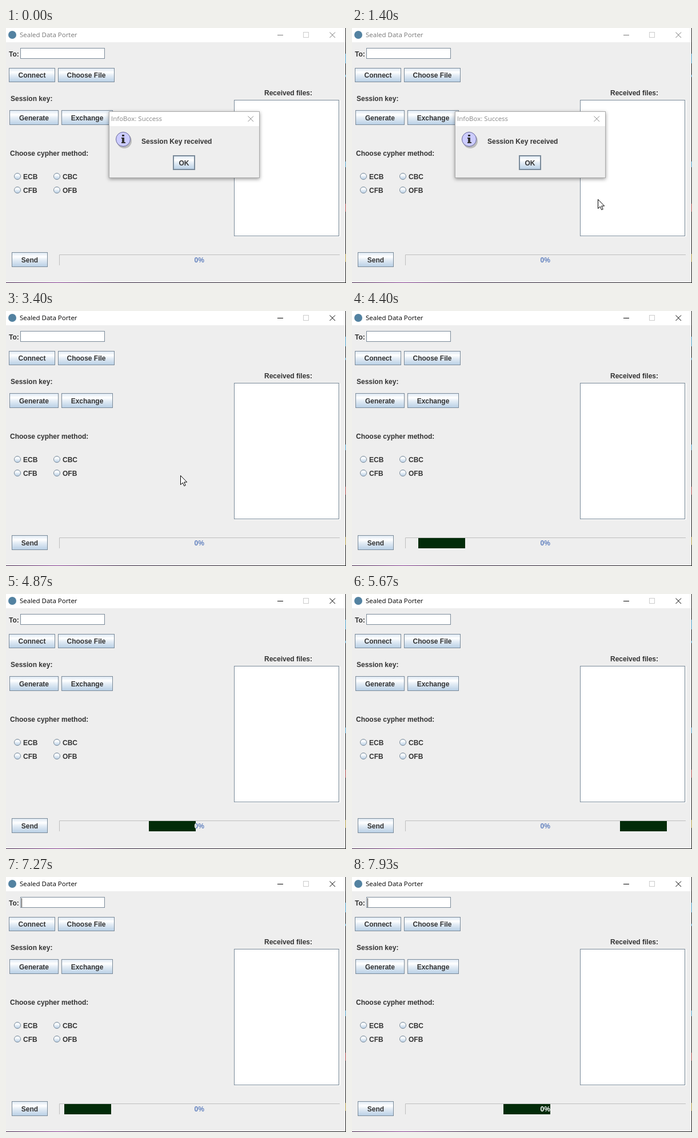
An HTML page for the animation above (8 s loop, 595x447 px).

```html
<!DOCTYPE html>
<html lang="en">
<head>
<meta charset="utf-8">
<title>File sender window</title>
<style>
  html, body { margin: 0; width: 100%; height: 100%; overflow: hidden; background: #eee; }
  svg { display: block; width: 595px; height: 447px; }
  text { font: bold 12px "Liberation Sans", Arial, sans-serif; fill: #333; white-space: pre; }
  .title { font: 11.5px "Open Sans", "Noto Sans", sans-serif; fill: currentColor; }
  .glyph { fill: none; stroke: currentColor; }
  .field { fill: #fff; stroke: #7a8a99; }
  .button { fill: url(#ocean); stroke: #7a8a99; }
</style>
</head>
<body>
<svg viewBox="0 0 595 447">
  <defs>
    <linearGradient id="ocean" x2="0" y2="1">
      <stop stop-color="#dde8f3"/><stop offset=".3" stop-color="#fff"/>
      <stop offset=".5" stop-color="#e6eef6"/><stop offset="1" stop-color="#b8cfe5"/>
    </linearGradient>
    <linearGradient id="edge">
      <stop stop-color="#402048"/><stop offset=".15" stop-color="#8a3c96"/>
      <stop offset=".35" stop-color="#30203a"/><stop offset="1" stop-color="#222"/>
    </linearGradient>
    <filter id="shadow" x="-10%" y="-10%" width="120%" height="125%">
      <feDropShadow dx="0" dy="2" stdDeviation="3" flood-opacity=".4"/>
    </filter>
    <clipPath id="overBar"><rect id="clip" y="398" width="82" height="18"/></clipPath>
  </defs>

  <rect width="595" height="447" fill="#eee"/>
  <g id="titleBar">
    <rect width="594" height="25" fill="#fff"/>
    <circle cx="11" cy="12" r="7" fill="#5382a1"/>
    <text class="title" x="24" y="16">Sealed Data Porter</text>
    <path class="glyph" d="M475 12.5h10M566.5 7.5l9.5 9.5m0-9.5l-9.5 9.5"/>
    <rect x="520.5" y="7.5" width="9" height="9" fill="none" stroke="#ccc"/>
  </g>
  <path d="M594.5 0V447" stroke="#222"/>
  <path d="M594.5 45v17m0 20v4m0 148v10" stroke="#4aa3cf"/>
  <path d="M594.5 308v14" stroke="#b04848"/>
  <path d="M594.5 396v14" stroke="#b8a040"/>
  <rect y="446" width="595" height="1" fill="url(#edge)"/>

  <text x="5" y="50">To:</text>
  <rect class="field" x="25.5" y="35.5" width="147" height="18"/>
  <rect id="caret" x="27" y="37" width="1" height="16" fill="#333"/>
  <text x="8" y="128">Session key:</text>
  <text x="7" y="224">Choose cypher method:</text>
  <text x="452" y="118">Received files:</text>
  <rect class="field" x="399.5" y="126.5" width="183" height="238"/>
  <path d="M584.5 127V366M400 365.5H584" stroke="#fff" fill="none"/>
  <g id="controls"></g>

  <path d="M93.5 416V397.5H584" fill="none" stroke="#bfbfbf"/>
  <text x="329.5" y="411" style="fill:#6382bf">0%</text>
  <g id="progress">
    <rect id="bar" y="398" width="82" height="18" fill="#022b09"/>
    <text x="329.5" y="411" clip-path="url(#overBar)" style="fill:#fff">0%</text>
  </g>

  <g id="dialog">
    <rect x="180.5" y="146.5" width="263" height="116" fill="#eee" stroke="#aaa" filter="url(#shadow)"/>
    <rect x="181" y="147" width="262" height="25" fill="#fff"/>
    <text class="title" x="184" y="163">InfoBox: Success</text>
    <path class="glyph" d="M423.5 154.5l9.5 9.5m0-9.5l-9.5 9.5"/>
    <circle cx="207" cy="198" r="13" fill="#bbb"/>
    <circle cx="205" cy="195" r="12.5" fill="#ccccff" stroke="#666699"/>
    <path d="M203 187h4v3h-4zM202 192h5v8h2v2h-7v-2h1v-6h-1z" fill="#333"/>
    <text x="237" y="203">Session Key received</text>
    <g id="dialogControls"></g>
  </g>
  <path id="cursor" d="M.5.5V16.5L4.2 13 6.8 18.7 9.2 17.6 6.7 12H11.7Z" fill="#fff" stroke="#000"/>
</svg>
<script>
const $ = id => document.getElementById(id);
const LOOP = 8000, TICK = 200 / 3;

const button = (label, x, y, w, h, line = 1) =>
  `<rect class="button" x="${x + line / 2}" y="${y + line / 2}" width="${w - line}" height="${h - line}" stroke-width="${line}"/>
   <text x="${x + w / 2}" y="${y + h / 2 + 4.5}" text-anchor="middle">${label}</text>`;
const radio = (label, x, y) =>
  `<circle class="button" cx="${x}" cy="${y}" r="5.5"/><text x="${x + 10}" y="${y + 5}">${label}</text>`;

$('controls').innerHTML =
  button('Connect', 5, 70, 81, 25) + button('Choose File', 91, 70, 99, 25) +
  button('Generate', 6, 144, 86, 26) + button('Exchange', 97, 144, 90, 26) +
  button('Send', 10, 393, 63, 26) +
  radio('ECB', 20, 260) + radio('CBC', 89, 260) + radio('CFB', 20, 284) + radio('OFB', 89, 284);
$('dialogControls').innerHTML = button('OK', 292, 223, 39, 26, 2);

// Keys are [time, value, ...]; values are interpolated linearly.
function track(keys, t) {
  if (t <= keys[0][0]) return keys[0].slice(1);
  const i = keys.findIndex(k => k[0] > t);
  if (i < 0) return keys.at(-1).slice(1);
  const a = keys[i - 1], b = keys[i], f = (t - a[0]) / (b[0] - a[0]);
  return a.slice(1).map((v, j) => v + (b[j + 1] - v) * f);
}

const barKeys = [[4325, 94], [4867, 250], [5133, 336], [5800, 502], [5840, 502], [6000, 459],
  [6400, 345], [6867, 216], [7267, 102], [7310, 94], [7667, 193], [7733, 193], [7933, 265]];
const cursorKeys = [[1267, 575, 400], [1400, 430, 300], [1540, 310, 240], [1600, 298, 235],
  [2000, 298, 235], [2130, 300, 250], [2270, 304, 280], [2333, 305, 288],
  [3600, 305, 288], [3667, 365, 391]];

const show = (id, on) => $(id).setAttribute('visibility', on ? 'visible' : 'hidden');

function draw(now) {
  const t = Math.floor((now % LOOP + 5) / TICK) * TICK;

  $('titleBar').style.color = t > 1790 ? '#000' : '#777';
  $('dialog').style.color = t > 1590 ? '#000' : '#888';
  $('dialog').setAttribute('opacity', track([[1690, 1], [1850, 0]], t)[0]);

  show('caret', t > 1884 && (t - 1884) % 1006 < 503);

  show('cursor', t > 1260 && t < 3700);
  const [x, y] = track(cursorKeys, t).map(Math.round);
  $('cursor').setAttribute('transform', `translate(${x} ${y})`);

  show('progress', t > 4325);
  const left = Math.round(track(barKeys, t)[0]);
  $('bar').setAttribute('x', left);
  $('clip').setAttribute('x', left);
}

let start;
function frame(now) {
  start ??= now;
  draw(now - start);
  requestAnimationFrame(frame);
}
draw(0);
requestAnimationFrame(frame);
</script>
</body>
</html>
```
